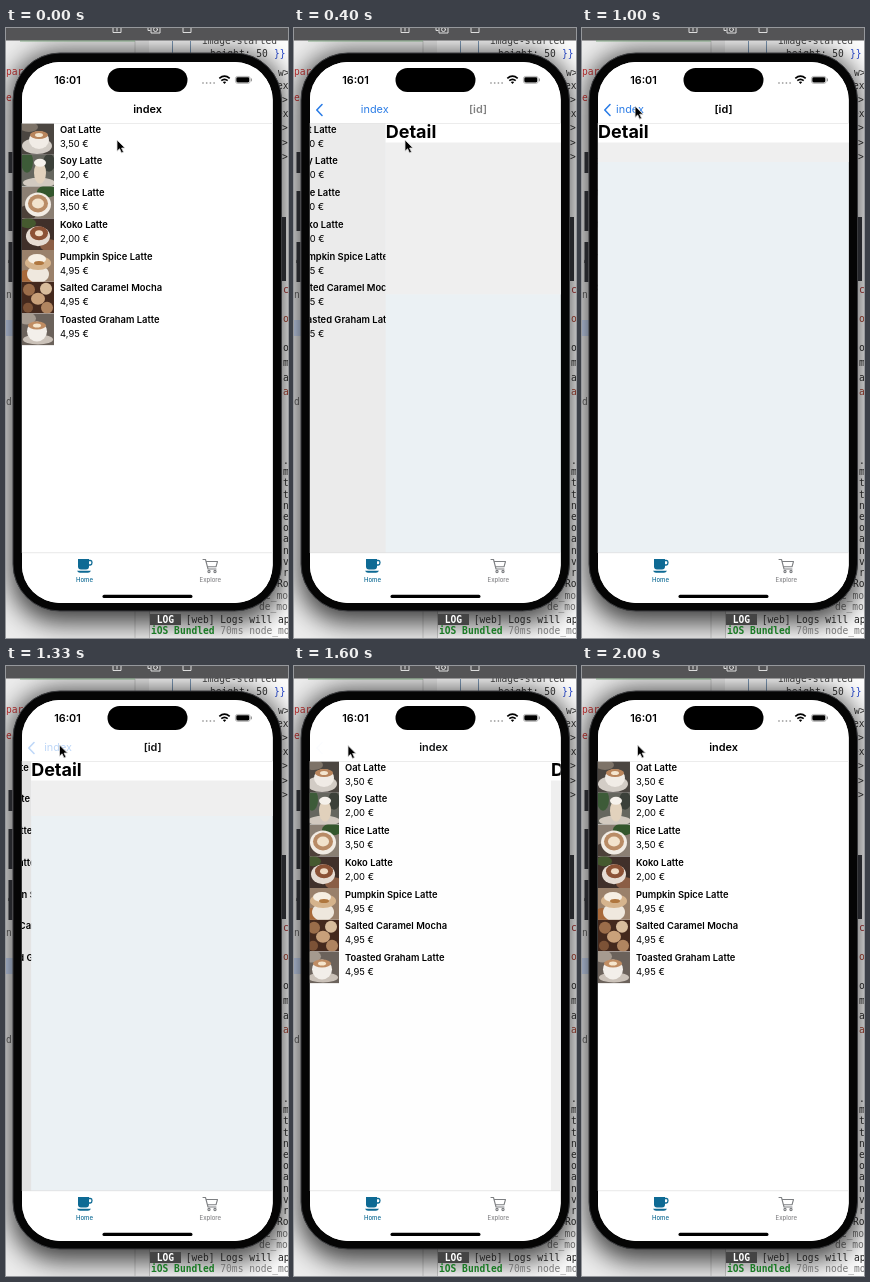
Recreate the animation shown at these times as an HTML page. Size 282x610 px, loop 2070 ms.

```html
<!DOCTYPE html>
<html lang="en">
<head>
<meta charset="utf-8">
<title>Coffee list</title>
<style>
  html, body { margin: 0; width: 100%; height: 100%; overflow: hidden; background: #eee; }
  svg { display: block; width: 282px; height: 610px; font-family: Inter, "Open Sans", sans-serif; }
  .mono { font: 9.6px "DejaVu Sans Mono", monospace; white-space: pre; }
  .mid { text-anchor: middle; }
  .semi { font-weight: 600; }
  .title { font-size: 10.9px; }
  .row { font-size: 9.4px; }
  .tab { font-size: 6px; font-weight: 500; }
  .line { fill: none; stroke-linecap: round; stroke-linejoin: round; }
</style>
</head>
<body>
<svg viewBox="0 0 282 610">
  <defs>
    <clipPath id="screen"><rect x="15.800" y="34" width="250.900" height="541" rx="38"/></clipPath>
    <clipPath id="thumb"><rect width="32" height="31.8"/></clipPath>
    <filter id="blur" x="-30%" y="-30%" width="160%" height="160%"><feGaussianBlur stdDeviation="13"/></filter>
  </defs>

  <!-- desktop behind the phone -->
  <rect width="282" height="610" fill="#ececec"/>
  <rect x="143" width="139" height="610" fill="#fcfcfc"/>
  <rect y="292" width="12" height="16" fill="#c9d8f4"/>
  <path d="M129 13V610M143.500 575V610" stroke="#c8c8c8"/>
  <path d="M166.500 13V30M184.500 13V30" stroke="#7f9cba"/>
  <g id="code" class="mono"></g>
  <rect x="5" y="24" width="272" height="571" rx="48" opacity=".74" filter="url(#blur)"/>
  <rect x="144" y="586" width="31" height="11" fill="#444"/>
  <text class="mono" x="145" y="595"><tspan fill="#fff" font-weight="700"> LOG </tspan><tspan fill="#222"> [web] Logs will ap</tspan></text>
  <text class="mono" x="145" y="606"><tspan fill="#197a24" font-weight="700">iOS Bundled</tspan><tspan fill="#777"> 70ms node_mo</tspan></text>
  <rect width="282" height="12.500" fill="#545456"/>
  <path d="M14 13H129" stroke="#6a9a6c" stroke-width=".8"/>
  <g class="line" stroke="#ddd">
    <path d="M107 0V4.500H115V0M111 0V3M142 0V2.500H144M145 0V5H154V0M177 0V4.500H185V0"/>
    <circle cx="149.500" cy="1.500" r="2"/>
  </g>

  <!-- phone body -->
  <path d="M4.500 124V145M4.500 163V203M4.500 214V254M278 189V253" stroke="#25262a" stroke-width="4"/>
  <rect x="7" y="25" width="268.500" height="558" rx="47" fill="#050505" stroke="#3a3b3e"/>
  <rect x="16.100" y="34" width="250.500" height="541" rx="38" fill="#fff"/>

  <g clip-path="url(#screen)">
    <g id="list"></g>
    <rect id="dim" x="16" y="95" width="251" height="430"/>
    <g id="detail">
      <rect x="16" y="95" width="251" height="430" fill="#ebf1f4"/>
      <rect id="gray" x="16" y="95" width="251" fill="#efefef"/>
      <rect x="16" y="95" width="251" height="19.500" fill="#fff"/>
      <text x="16" y="110.300" font-size="18" font-weight="700">Detail</text>
    </g>
    <path d="M16 34H267V95H16Z" fill="#fff"/>
    <path d="M16 95.500H267" stroke="#e4e4e4" stroke-width=".7"/>
    <text id="heading" class="mid semi title" y="85">index</text>
    <g id="back" fill="#2c7de6">
      <path id="chevron" class="line" d="M28 76.500L22.800 82L28 87.500" stroke="#2c7de6" stroke-width="1.600"/>
      <text id="label" class="mid title" y="85">index</text>
    </g>
    <text id="param" class="mid semi title" y="85">[id]</text>

    <!-- tab bar -->
    <path d="M16 525H267V575H16Z" fill="#fff"/>
    <path d="M16 524.700H267" stroke="#e0e0e0" stroke-width=".7"/>
    <g fill="#0e6a94">
      <path d="M72 531H83V538.500Q83 541.500 80 541.500H75Q72 541.500 72 538.500ZM71 542.800H85Q84 544.800 82 544.800H74Q72 544.800 71 542.800Z"/>
      <path class="line" d="M83 532.500H84.500Q86 532.500 86 534.500T84.500 537H83" stroke="#0e6a94" stroke-width="1.300"/>
      <text class="tab mid" x="78.500" y="554">Home</text>
    </g>
    <g class="line" stroke="#7d7f82" stroke-width="1.100">
      <path d="M197 531.500H199.500L202 541H210M200 533.500H211.500L210 538.800H201.500"/>
      <circle cx="203" cy="543.500" r="1.100"/><circle cx="209" cy="543.500" r="1.100"/>
    </g>
    <text class="tab mid" x="204.300" y="554" fill="#858588">Explore</text>
    <rect x="96.500" y="566.800" width="90" height="3.200" rx="1.600"/>
  </g>

  <!-- status bar -->
  <text class="mid semi" x="61.500" y="55.800" font-size="10.800">16:01</text>
  <rect x="101.500" y="40" width="80" height="24" rx="12"/>
  <path class="line" d="M197 55H209" stroke="#aaa" stroke-width="1.800" stroke-dasharray="0 3.700"/>
  <path d="M213.300 50.300Q218.500 46 223.700 50.300M215.300 52.600Q218.500 50 221.700 52.600" fill="none" stroke="#000" stroke-width="1.700"/>
  <path d="M216.800 54Q218.500 52.900 220.200 54L218.500 56Z"/>
  <rect x="229.400" y="48.400" width="14.800" height="7" rx="2.300" fill="none" stroke="#999" stroke-width=".7"/>
  <rect x="230.300" y="49.300" width="13" height="5.200" rx="1.400"/>
  <path d="M245.500 50.500V53.300" stroke="#999"/>

  <path id="cursor" d="M0 0V11.200L2.600 8.800L4.500 13L6.500 12.100L4.600 8H8Z" stroke="#ddd" stroke-width=".8"/>
</svg>

<script>
const el = id => document.getElementById(id);
const rowHeight = 31.75;

// Thumbnail: background, then ellipses as "cx cy rx ry colour"
const items = [
  ['Oat Latte', '3,50', '#4b4641', ['7 4 9 5 #7d7368', '15 23 15 8 #d3cdc6', '17 17 10 9 #f1ece6', '17 12 9 4 #b9855c', '17 12 4 2 #f4e6d0']],
  ['Soy Latte', '2,00', '#66675f', ['5 7 6 11 #3d5b38', '27 8 6 9 #3b4039', '17 28 16 5 #d2cac0', '18 18 6 11 #e2d2bd', '18 8 6 4 #f6f2ec']],
  ['Rice Latte', '3,50', '#8b7f73', ['25 5 10 6 #33562c', '5 27 9 8 #4d4139', '16 18 13 12 #f2ece4', '16 17 10 9 #b98c66', '16 17 6 5 #f2e3cd']],
  ['Koko Latte', '2,00', '#40302a', ['6 5 8 5 #45592f', '27 27 9 6 #8b5e45', '16 18 12 10 #e6dcd3', '17 15 9 7 #8c5236', '17 15 4 3 #f0dcc6']],
  ['Pumpkin Spice Latte', '4,95', '#9a816b', ['4 27 8 7 #a8693a', '16 24 11 9 #efe8de', '16 13 13 7 #d6b48d', '15 9 9 5 #f7efe3', '17 13 5 2 #b0773f']],
  ['Salted Caramel Mocha', '4,95', '#44291d', ['7 8 6 6 #9b6d4a', '24 7 6 6 #d9bd9c', '16 17 7 6 #c9a17a', '6 26 5 5 #7c5236', '25 26 6 6 #b08560']],
  ['Toasted Graham Latte', '4,95', '#6b625b', ['5 5 9 6 #a69b90', '16 26 15 5 #cbc2b9', '15 18 10 10 #f3efea', '15 12 9 4 #c08d63', '15 12 4 2 #f6e6cd']],
];

el('list').innerHTML = '<path d="M-70 95H267V525H-70Z" fill="#fff"/>' +
  items.map(([name, price, back, shapes], i) => {
    const blobs = shapes.map(s => {
      const [cx, cy, rx, ry, fill] = s.split(' ');
      return `<ellipse cx="${cx}" cy="${cy}" rx="${rx}" ry="${ry}" fill="${fill}"/>`;
    }).join('');
    return `<g transform="translate(16 ${95 + i * rowHeight})">
      <g clip-path="url(#thumb)"><rect width="32" height="32" fill="${back}"/>${blobs}</g>
      <text class="row semi" x="38" y="9.500">${name}</text>
      <text class="row" x="38" y="23.700">${price} €</text></g>`;
  }).join('');

// Scraps of editor text: x, baseline, colour, text
const scraps = [
  [196, 16, '#444', 'image-started'], [204, 29, '#333', 'height: 50 '], [268, 29, '#24c', '}}'],
  [0, 47, '#c33', 'par'], [0, 73, '#c33', 'e'], [0, 234, '#555', ','], [0, 270, '#666', 'n'], [0, 377, '#666', 'd-'],
  [272, 48, '#333', 'w>'], [271, 61, '#333', 'ext'], [276, 75, '#333', '>'], [271, 89, '#333', 'ext'],
  [276, 103, '#333', '>'], [276, 118, '#333', '>'], [276, 132, '#333', '>'],
  [277, 265, '#a33', 'c'], [277, 294, '#a43', 'o'], [277, 323, '#333', 'o'],
  [277, 338, '#333', 'm'], [277, 353, '#333', 'a'], [277, 367, '#a43', 'a'],
  [271, 559, '#333', 'Ro'], [259, 571, '#777', 'e_mo'], [253, 582, '#777', 'de_mo'],
];
[...'.mttneoanvr'].forEach((c, i) => scraps.push([277, 436 + i * 11.2, '#333', c]));
el('code').innerHTML = scraps.map(([x, y, fill, s]) => `<text x="${x}" y="${y}" fill="${fill}">${s}</text>`).join('');

// Pointer path: ms, x, y
const path = [
  [0, 111, 112], [470, 111, 112], [600, 94, 103], [670, 79, 95], [730, 62, 84],
  [800, 56, 78], [930, 53, 78], [1330, 53.5, 79], [1600, 54, 79.5], [2000, 55.5, 79],
];
function pointer(t) {
  const i = path.findIndex(k => k[0] > t);
  if (i < 0) return path[path.length - 1].slice(1);
  const [a, b] = [path[i - 1], path[i]], u = (t - a[0]) / (b[0] - a[0]);
  return [1, 2].map(j => a[j] + (b[j] - a[j]) * u);
}

// Critically damped spring, falling from 1 to 0
function spring(ms) {
  const x = Math.max(0, ms) * .0175;
  return (1 + x) * Math.exp(-x);
}

const loop = 2070;
const tick = n => Math.round(n * 20 / 3) * 10;
function snap(t) {
  const n = Math.floor((t + 4) * .015);
  return tick(tick(n) > t ? n - 1 : n);
}

const move = (id, x, y = 0) => el(id).setAttribute('transform', `translate(${x} ${y})`);
const fade = (id, o) => el(id).setAttribute('opacity', Math.min(1, Math.max(0, o)));

function draw(t) {
  const p = t < 1313 ? 1 - spring(t - 261) : spring(t - 1313);
  const offset = 251 * (1 - p);
  move('list', -75 * p);
  move('detail', offset);
  el('gray').setAttribute('height', Math.min(430, 39 + 1.75 * offset));
  fade('dim', .11 * p);

  const labelX = 141.5 - 93.5 * p ** 1.2;
  move('heading', labelX);
  move('label', labelX);
  move('param', 141.5 + 141 * (1 - p));
  fade('heading', 1 - 2 * p);
  fade('label', 1.5 * p);
  fade('chevron', 1.5 * p);
  fade('param', p * p);
  fade('back', t < 1200 ? 1 : .3);
  move('cursor', ...pointer(t));
}

function frame() {
  draw(snap(performance.now() % loop));
  requestAnimationFrame(frame);
}
frame();
</script>
</body>
</html>
```
